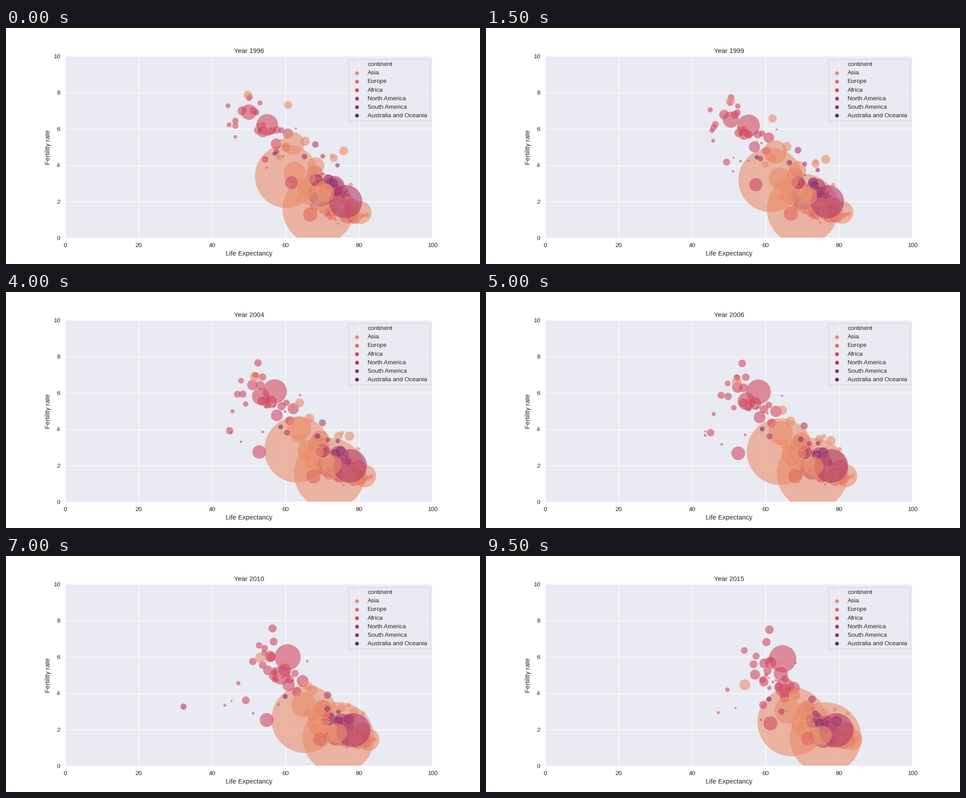
Animation of 1058 by 529 pixels, one loop 10000 ms. Source, as a matplotlib script:

```python
import numpy as np
import matplotlib.pyplot as plt
from matplotlib.animation import FuncAnimation

FRAMES, STEP = 20, 500
FIRST_YEAR = 1996
MAX_AREA = 17050
CONTINENTS = {
    "Asia": "#e98d6b", "Europe": "#e3685c", "Africa": "#d14a61",
    "North America": "#b13c6c", "South America": "#8f3371",
    "Australia and Oceania": "#6c2b6d",
}
AS, EU, AF, NA, SA, OC = CONTINENTS.values()

plt.rcParams.update({
    "font.family": "Liberation Sans", "font.size": 12,
    "axes.titlesize": 12, "axes.labelsize": 12,
    "xtick.labelsize": 11, "ytick.labelsize": 11, "legend.fontsize": 11,
    "text.color": ".15", "axes.labelcolor": ".15",
    "xtick.color": ".15", "ytick.color": ".15",
    "axes.facecolor": "#eaeaf2", "axes.edgecolor": "white",
    "axes.linewidth": 1.25, "axes.grid": True, "axes.axisbelow": True,
    "grid.color": "white", "grid.linewidth": 1,
    "xtick.bottom": False, "ytick.left": False,
    "xtick.major.size": 6, "ytick.major.size": 6,
})

rng = np.random.default_rng(8)
t = np.linspace(0, 1, FRAMES)
colors, tracks = [], []


def add(color, people, life0, births0, life1, births1,
        dip=0, fall=None, shock=None):
    """One country, from its first to its last life expectancy and fertility.

    dip lowers life expectancy midway, fall bends the fertility curve,
    shock is a (step, life) pair for a single disastrous year.
    """
    rise = 1.8 if color == AF else 1
    fall = fall or (1 if color == AF else 1.4)
    life = life0 + (life1 - life0) * t ** rise - dip * np.sin(np.pi * t)
    births = births0 + (births1 - births0) * (1 - (1 - t) ** fall)
    if shock:
        life[shock[0]] = shock[1]
    # The more children, the faster the population grows
    growth = .15 * ((births0 + births1) / 2 - 1)
    colors.append(color)
    tracks.append((life, births, people * (1 + growth * t)))


def crowd(color, count, people, life0, births0, life1, births1):
    """Scatter smaller countries around a common path."""
    for _ in range(count):
        z, dx, dy = rng.normal(size=3)
        add(color, people * rng.lognormal(0, .8),
            life0 + 1.8 * z, births0 - .2 * z + .12 * dy,
            life1 + 1.4 * z + .4 * dx, births1 - .12 * z + .1 * dy)


# Large countries underneath
add(AS, 1218, 68.9, 1.6, 76.3, 1.55)
add(SA, 164, 69.6, 2.43, 75.6, 1.75)
add(AF, 62, 67.9, 3.55, 71.2, 3.1, fall=2)
add(AS, 967, 60.3, 3.4, 67.2, 2.43)
add(AS, 119, 62.4, 3.6, 71.8, 2.1)
add(AS, 200, 67, 2.6, 71.1, 2.35)
add(NA, 94, 73.3, 2.87, 76, 2.22)

crowd(EU, 13, 5, 71.5, 1.4, 76, 1.5)
crowd(EU, 12, 8, 77.8, 1.6, 81.3, 1.65)
crowd(AS, 18, 7, 70.5, 2.6, 75, 2.2)
crowd(NA, 9, 4, 73.5, 2.8, 76.8, 2.2)
crowd(SA, 6, 13, 73, 2.7, 76.3, 2.2)
crowd(AF, 7, 1.5, 55, 5.8, 62, 4.7)
crowd(AF, 4, 10, 70.5, 3, 74, 2.5)
crowd(OC, 4, .3, 67, 3.8, 70.5, 3.3)

# Europe and the rich east
add(EU, 82, 77, 1.3, 80.9, 1.45)
add(EU, 58, 78, 1.75, 82.2, 1.98)
add(EU, 57, 78.6, 1.2, 82.4, 1.47)
add(EU, 40, 78.2, 1.18, 82.8, 1.33)
add(EU, 38, 72.4, 1.5, 77.7, 1.35)
add(AS, 126, 80.3, 1.4, 83.2, 1.46)
add(AS, 45, 74, 1.5, 81.5, 1.28)

# Africa
add(AF, 14, 51.3, 7, 59.6, 5.65)
add(AF, 6, 44.3, 7.28, 61.3, 5.85)
add(AF, 14, 56.2, 5.9, 59.5, 4.63, dip=2)
add(AF, 3.4, 46.3, 5.57, 49.6, 4.2, dip=1.5)
add(AF, 7, 50, 7.68, 57.4, 6.05)
add(AF, 3.2, 53, 6, 61, 4.3, shock=(4, 37.6))
add(AF, 58, 50, 6.93, 65.2, 4.3)
add(AF, 1.1, 62.8, 6.03, 68.1, 5.68)
add(AF, 17, 60, 5, 65.2, 3.75)
add(AF, 8, 53.8, 6.24, 59.2, 4.75)
add(AF, 28, 57.4, 5.18, 65.2, 4.2, dip=1.5)
add(AF, 14, 57.6, 5.95, 63.6, 4.35)
add(AF, 10, 46.3, 6.45, 60.5, 5.24, dip=1)
add(AF, 9.4, 46.3, 6.18, 56.7, 5.6, dip=1.7)
add(AF, 9.8, 52, 6.92, 60.2, 6.82)
add(AF, 16, 52.5, 5.93, 57.1, 5.03)
add(AF, 9.8, 50.2, 7.77, 61, 7.5)
add(AF, 111, 55, 6.23, 64.6, 5.9)
add(AF, 6, 44.6, 6.23, 66, 4.25)
add(AF, 9, 58.8, 5.93, 65.3, 4.8)
add(AF, 6.5, 53, 7.43, 54.2, 6.36, dip=1.3)
add(AF, 25, 60.6, 5.75, 67.6, 4.3)
add(AF, 31, 53.8, 5.85, 64.1, 5.08)
add(AF, 21, 48.2, 7, 61.3, 5.68)

# Epidemic years in the south
add(AF, 42, 61.6, 3.05, 61.3, 2.35, dip=9)
add(AF, 11.6, 54.4, 4.33, 59.3, 3.36, dip=11)
add(AF, 1.6, 54.8, 3.87, 58.7, 2.55, dip=8)
add(AF, 1.8, 59.3, 4.48, 47.1, 2.94, dip=12)
add(AF, .95, 57.2, 4.65, 51.8, 3.2, dip=12)
add(AF, 1.7, 57.9, 4.48, 65.8, 3, dip=6)

# The rest of Asia and Oceania
add(AS, 17.5, 49.7, 7.87, 54.3, 4.47, fall=.62)
add(AS, 11, 58.3, 4.43, 68.7, 2.65)
add(AS, 20, 65.3, 5.33, 68, 3.95)
add(AS, 5, 77.7, 2.93, 82.3, 2.88)
add(AS, 4.8, 72.6, 4.53, 78.8, 3.12)
add(AS, 15.5, 63.4, 2.15, 70, 2.68)
add(AS, 22, 60.2, 4.98, 70, 2.2)
add(AS, 125, 62, 5.2, 66, 3.05)
add(AS, 71, 68.2, 3.97, 71, 3)
add(AS, 19, 75.8, 4.8, 79.5, 2.6)
add(AS, 15, 73.1, 4.4, 76, 2.95)
add(AS, 60, 70.2, 1.8, 74.8, 1.5)
add(AS, 60, 70.5, 2.7, 79, 2.08)
add(AS, 15.6, 60.7, 7.32, 68, 3.83)
add(OC, 4.9, 57, 4.65, 60.9, 3.68)

# The Americas, then two late neighbours on top
add(SA, 7.6, 65.1, 4.48, 73.5, 2.9)
add(NA, 10.3, 68.1, 5.15, 72.6, 3.67)
add(NA, 7.8, 57.5, 4.75, 64.3, 3, shock=(14, 32.2))
add(NA, 5.7, 70.1, 4.5, 73.4, 2.5)
add(SA, 4.9, 74.1, 4, 74.4, 2.8)
add(SA, 24.5, 71.7, 3.23, 79.3, 2.45)
add(EU, 51, 66.7, 1.3, 71.5, 1.5, dip=1.2)
add(NA, 269, 76.3, 2, 79.2, 1.97)
add(AS, 23, 66.7, 3.3, 71.9, 2.27)
add(SA, 22.7, 73, 3.03, 74.8, 2.35)
add(AS, 74, 70.8, 2.5, 75.4, 1.7)

life, births, people = np.array(tracks).transpose(1, 0, 2)
areas = MAX_AREA * people / people.max(axis=0)

fig, ax = plt.subplots(figsize=(12, 6), dpi=88.17, facecolor="white")
bubbles = ax.scatter(life[:, 0], births[:, 0], s=areas[:, 0], c=colors,
                     alpha=.6, edgecolors="white", linewidths=.25)
ax.set(xlim=(0, 100), ylim=(0, 10),
       xlabel="Life Expectancy", ylabel="Fertility rate")
title = ax.set_title("")

keys = [ax.scatter([], [], s=36, color="white", alpha=0, label="continent")]
keys += [ax.scatter([], [], s=36, color=c, label=name)
         for name, c in CONTINENTS.items()]
ax.legend(handles=keys, loc="upper right")


def draw(i):
    bubbles.set_offsets(np.column_stack([life[:, i], births[:, i]]))
    bubbles.set_sizes(areas[:, i], fig.dpi)
    title.set_text(f"Year {FIRST_YEAR + i}")
    return bubbles, title


anim = FuncAnimation(fig, draw, frames=FRAMES, interval=STEP,
                     repeat=True, repeat_delay=0)
plt.show()
```
